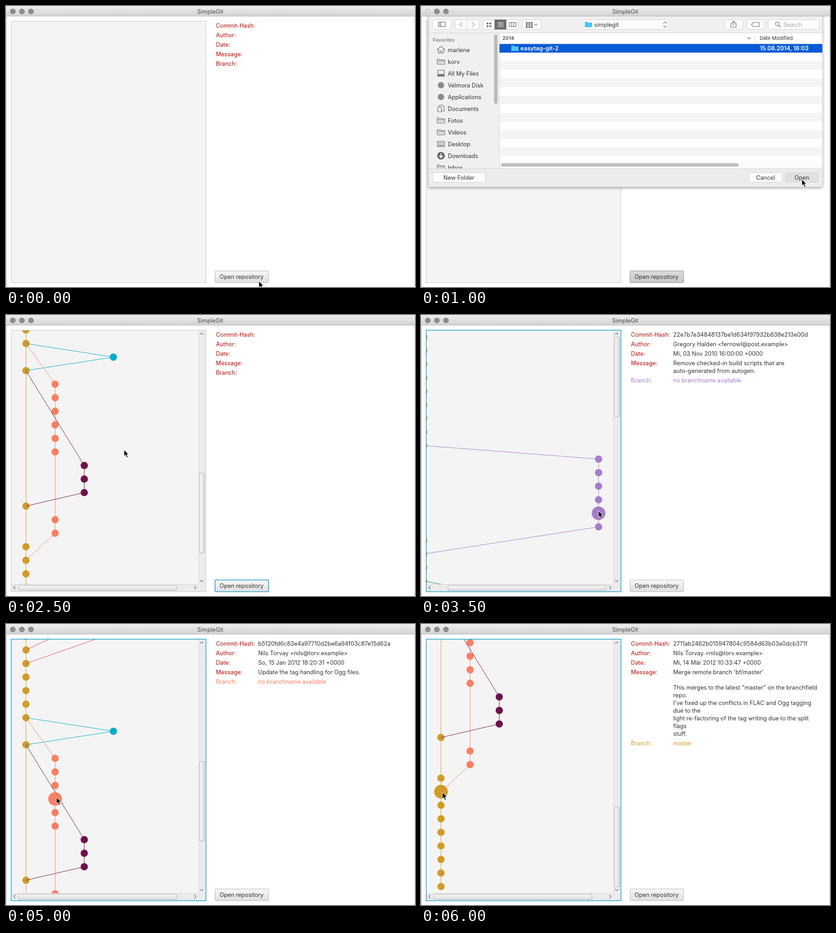
Animation of 901 by 621 pixels, one loop 6500 ms. Source, as an HTML page:

```html
<!DOCTYPE html>
<html lang="en">
<head>
<meta charset="utf-8">
<title>SimpleGit</title>
<style>
  html, body { margin: 0; width: 100%; height: 100%; overflow: hidden; background: #fff; }
  svg { display: block; width: 901px; height: 621px; }
  text { font: 12.7px Inter, Roboto, sans-serif; fill: #333; white-space: pre; }
  .small { font-size: 11px; }
  .mid { text-anchor: middle; }
  .key { fill: #b80a0a; }
  .icon { fill: none; stroke: #6a6a6a; stroke-width: 1.2; }
  .box { fill: #fdfdfd; stroke: #d3d3d3; }
</style>
</head>
<body>
<svg id="stage" viewBox="0 0 901 621">
  <defs>
    <linearGradient id="bar" x2="0" y2="1"><stop stop-color="#ededed"/><stop offset="1" stop-color="#d3d3d3"/></linearGradient>
    <linearGradient id="btn" x2="0" y2="1"><stop stop-color="#f7f7f7"/><stop offset="1" stop-color="#e0e0e0"/></linearGradient>
    <linearGradient id="btnDown" x2="0" y2="1"><stop stop-color="#dadada"/><stop offset="1" stop-color="#c9c9c9"/></linearGradient>
    <linearGradient id="thumbV"><stop stop-color="#f8f8f8"/><stop offset="1" stop-color="#dedede"/></linearGradient>
    <linearGradient id="thumbH" x2="0" y2="1"><stop stop-color="#f8f8f8"/><stop offset="1" stop-color="#dedede"/></linearGradient>
    <filter id="shade" x="-5%" y="-5%" width="110%" height="112%"><feDropShadow dx="0" dy="2" stdDeviation="3.5" flood-opacity=".42"/></filter>
    <clipPath id="view"><rect x="12" y="34" width="412" height="561"/></clipPath>
    <clipPath id="side"><rect x="17" y="60" width="155" height="299"/></clipPath>
    <clipPath id="below"><rect y="23" width="901" height="598"/></clipPath>
  </defs>
  <rect width="901" height="621" fill="#fff"/>
  <g id="window"></g>
  <g id="pane"></g>
  <g id="details"></g>
  <g id="button"></g>
  <g id="sheet"></g>
  <path id="cursor" d="M0 0V14.2L3.3 11.2 5.9 17 8.4 15.9 5.9 10.2H10.2Z" fill="#000" stroke="#fff" stroke-width="1"/>
</svg>
<script>
const $ = id => document.getElementById(id);
const esc = s => s.replace(/&/g, '&amp;').replace(/</g, '&lt;');
const rect = (x, y, w, h, attr = '') => `<rect x="${x}" y="${y}" width="${w}" height="${h}" ${attr}/>`;
const text = (x, y, s, attr = '') => `<text x="${x}" y="${y}" ${attr}>${esc(s)}</text>`;
const path = (d, attr = 'class="icon"') => `<path d="${d}" ${attr}/>`;
const disc = (x, y, r, fill) => `<circle cx="${x}" cy="${y}" r="${r}" fill="${fill}"/>`;

// ---- commit graph ----
const lanes = '0000000006666660000055545400000003' + '0111111222011000000000';
const colors = ['#d29b26', '#f97f61', '#6f114c', '#00aec7', '#dc4c57', '#078a5d', '#a57ccb'];
const links = [[0, 55], [9, 14], [20, 24], [23, 25], [35, 46], [41, 43],
  [8, 9], [14, 16], [18, 20], [24, 26], [19, 23], [23, 27], [25, 28],
  [32, 33], [33, 34], [32, 35], [34, 41], [43, 44], [46, 48]];
const maxScroll = 1115.5;
const nodeX = n => +(44 + 64.2 * lanes[n]).toFixed(2);
const nodeY = n => +(49 + 29.94 * n).toFixed(2);
const node = (n, r) => disc(nodeX(n), nodeY(n), r, colors[lanes[n]]);
const graph = [...lanes].map((_, n) => node(n, 8)).join('') + links.map(([a, b]) =>
  path(`M${nodeX(a)} ${nodeY(a)}L${nodeX(b)} ${nodeY(b)}`,
    `stroke="${colors[Math.max(lanes[a], lanes[b])]}"`)).join('');

function drawPane({ scroll, shift = 0, hover, focus }) {
  let out = rect(11.5, 33.5, 429, 578, 'fill="#f4f4f4" stroke="#c6c6c6"');
  if (scroll !== undefined) {
    const chevron = 'fill="none" stroke="#737373" stroke-width="1.2"';
    const thumb = 'rx="2" stroke="#b2b2b2" fill=';
    out += `<g clip-path="url(#view)"><g transform="translate(${-shift} ${-scroll})">${graph}` +
      (hover === undefined ? '' : node(hover, 15)) + '</g></g>' +
      rect(424, 34, 16, 577, 'fill="#ebebeb"') + rect(12, 595, 412, 16, 'fill="#ebebeb"') +
      path('M424.5 34V595M12 595.5H424', 'stroke="#d8d8d8"') +
      path('M427.5 43L431 39.5 434.5 43M427.5 586L431 589.5 434.5 586', chevron) +
      path('M20.5 598.5L17 602.5 20.5 606.5M415 598.5L418.5 602.5 415 606.5', chevron) +
      rect(426.5, 48.5 + 356 * scroll / maxScroll, 10.5, 176, thumb + '"url(#thumbV)"') +
      rect(27.5 + shift * 32 / 38, 597.5, 349, 11, thumb + '"url(#thumbH)"');
  }
  if (focus) out += rect(11.5, 33.5, 429, 578, 'fill="none" stroke="#18a2d1" stroke-width="1.5"');
  return out;
}

// ---- commit details ----
const unnamed = 'no branchname available';
const commits = {
  13: ['22e7b7e34848137be1d634f97932b838e213e00d', 'Gregory Halden <fernowl@post.example>',
    'Mi, 03 Nov 2010 16:00:00 +0000',
    'Remove checked-in build scripts that are\nauto-generated from autogen.', unnamed],
  22: ['8c41d07be92a5f3360e1bb94d7f25a08c6913e7c', 'Nils Torvay <nils@torv.example>',
    'Mo, 07 Feb 2011 11:42:18 +0000', 'Tidy up the build files.', unnamed],
  31: ['30a13ab5271ed2ec11a2b876c70c5cdce8b4276c', 'Nils Torvay <nils@torv.example>',
    'Sa, 23 Apr 2011 16:25:49 +0100',
    'Add a basic HACKING document to mention the\nprefered form for requests\nand what the coding style seems to be.', 'master'],
  38: ['b5120fd6c83e4a97710d2be6a94f03c87e15d62a', 'Nils Torvay <nils@torv.example>',
    'So, 15 Jan 2012 18:20:31 +0000', 'Update the tag handling for Ogg files.', unnamed],
  43: ['e4ba7c1a40a87015f73dc5a5630d543437030278', 'pebble7340 <me@pebble.example>',
    'Do, 16 Feb 2012 03:04:22 +0100',
    'Let the user choose which fields to split\n\nAdd a new Frame to the "Tag Settings" tab in the\npreferences, where the user can\nturn field splitting of for all fields, which were splitted\npreviously.\nAs this applies to vorbis comments in general, adapt\neverything for ogg files\ntoo.', unnamed],
  48: ['2711ab2462b015947804c9584d63b03a0dcb371f', 'Nils Torvay <nils@torv.example>',
    'Mi, 14 Mär 2012 10:33:47 +0000',
    "Merge remote branch 'bf/master'\n\nThis merges to the latest \"master\" on the branchfield\nrepo.\nI've fixed up the conflicts in FLAC and Ogg tagging\ndue to the\nlight re-factoring of the tag writing due to the split\nflags\nstuff.", 'master']
};

function drawDetails({ hover }) {
  const values = commits[hover] || ['', '', '', '', ''];
  let y = 47.8;
  return ['Commit-Hash:', 'Author:', 'Date:', 'Message:', 'Branch:'].map((label, i) => {
    const tint = i === 4 && hover !== undefined ? `style="fill:${colors[lanes[hover]]}"` : '';
    const lines = values[i].split('\n');
    const out = text(462.5, y, label, tint || 'class="key"') +
      lines.map((s, k) => text(555.5, y + 17 * k, s, tint)).join('');
    y += 21 + 17 * (lines.length - 1);
    return out;
  }).join('');
}

function drawButton({ button }) {
  const stroke = { down: '#8f8f8f', focus: '#1b9fcf' }[button] || '#b7b7b7';
  const fill = button === 'down' ? 'btnDown' : 'btn';
  return rect(460.5, 585.5, 118, 26, `rx="2.5" fill="url(#${fill})" stroke="${stroke}" stroke-width="${button === 'focus' ? 1.6 : 1}"`) +
    text(519, 603, 'Open repository', 'class="mid"');
}

function drawWindow({ sheet }) {
  return rect(0, 0, 901, 22, 'fill="url(#bar)"') + path('M0 22.5H901', 'stroke="#b4b4b4"') +
    path('M.5 23V621', 'stroke="#a3a9b2"') + path('M900.5 23V621', 'stroke="#c4c4c4"') +
    [15, 35, 55].map((x, i) => `<circle cx="${x}" cy="12" r="5.6" ${sheet && !i
      ? 'fill="#dcdcdc" stroke="#c4c4c4"' : 'fill="#8e8e8e" stroke="#7b7b7b"'}/>`).join('') +
    text(450, 17, 'SimpleGit', 'class="mid" style="fill:#4a4a4a"');
}

// ---- file chooser ----
const folder = (x, y) => path(`M${x} ${y - 6}h6l2 2h9v10h-17zM${x} ${y - 2}h17`, 'fill="#d9d9d9" stroke="#777"');
const blueFolder = (x, y) => path(`M${x} ${y - 6}h6l2 2h8v10h-16z`, 'fill="#4fc3f3"');
const sideIcons = {
  home: y => path(`M35 ${y}L44 ${y - 8} 53 ${y}M38 ${y - 2}v9h12v-9M42 ${y + 7}v-5h4v5`),
  folder: y => folder(35.5, y),
  files: y => rect(37, y - 7, 14, 9, 'class="icon"') + rect(36, y + 2, 16, 5, 'fill="#777"'),
  mark: y => disc(44, y, 7, '#8a8a8a'),
  docs: y => path(`M37 ${y - 4}h8v11h-8zM41 ${y - 4}v-4h6l4 4v9h-6`),
  desktop: y => rect(36, y - 6, 16, 12, 'fill="#ccc" stroke="#777"') + path(`M38 ${y + 3.5}h12`),
  down: y => disc(44, y, 8.5, '#6a6a6a') + path(`M44 ${y - 5}v8M40.5 ${y}l3.5 4 3.5-4`, 'fill="none" stroke="#fff" stroke-width="2"')
};
const places = [['marlene', 'home'], ['korv', 'folder'], ['All My Files', 'files'], ['Velmora Disk', 'mark'],
  ['Applications', 'mark'], ['Documents', 'docs'], ['Fotos', 'folder'], ['Videos', 'folder'],
  ['Desktop', 'desktop'], ['Downloads', 'down'], ['Inbox', 'folder']];

function toolbar() {
  const boxes = [[25, 41], [75, 52], [136, 78], [223, 41], [355, 191], [669, 39], [717, 39], [764, 113]];
  let grid = '';
  for (let i = 0; i < 4; i++) grid += rect(145 + 6 * (i % 2), 37 + 6 * (i >> 1), 3.5, 3.5, 'fill="#555"');
  for (let i = 0; i < 9; i++) grid += rect(231 + 5.5 * (i % 3), 36 + 4.5 * (i / 3 | 0), 4, 3, 'fill="#555"');
  return boxes.map(([x, w]) => rect(x + .5, 30.5, w, 21, 'rx="3.5" class="box"')).join('') + grid +
    rect(162, 30, 26, 22, 'fill="#6c6c6c"') + path('M101.5 31V51', 'stroke="#d3d3d3"') +
    rect(38.5, 35.5, 15, 10, 'class="icon"') + path('M43.5 35.5v10M40 38h2M40 40.5h2M40 43h2') +
    path('M91 36L85 41 91 46M112 36L118 41 112 46', 'fill="none" stroke="#a9a9a9" stroke-width="1.4"') +
    path('M169 36.5h13M169 39.5h13M169 42.5h13M169 45.5h13', 'stroke="#fff"') +
    rect(194.5, 36.5, 15, 9, 'class="icon"') + path('M199.5 36.5v9M204.5 36.5v9') +
    path('M250 39.5l3 3 3-3M534 38.5l3.5-3.5 3.5 3.5M534 43.5l3.5 3.5 3.5-3.5') +
    blueFolder(361, 41) + text(381.5, 45.5, 'simplegit') +
    path('M686 38h-3v9h11v-9h-3M688.5 43V33.5M685.5 36.5l3-3 3 3') +
    path('M728 41l4-4.5h13v9h-13z') +
    '<circle cx="785" cy="39.5" r="4.2" class="icon"/>' + path('M788 43l4 4') +
    text(798, 45.5, 'Search', 'style="fill:#a8a8a8"');
}

function drawSheet({ sheet }) {
  if (!sheet) return '';
  const picked = sheet === 'picked';
  const rowStyle = picked ? 'style="fill:#fff;font-weight:600"' : '';
  let out = `<g clip-path="url(#below)">${rect(17, 15, 867, 384.5, 'fill="#ececec" filter="url(#shade)"')}</g>` +
    rect(17, 23, 867, 36, 'fill="#f0f0f0"') + toolbar() +
    rect(17, 60, 155, 299, 'fill="#f0f0f0"') + rect(173, 60, 711, 299, 'fill="#fff"');
  for (let y = 84; y < 330; y += 38) out += rect(173, y, 711, 19, 'fill="#f4f4f4"');
  if (picked) out += rect(173, 84, 711, 19, 'fill="#075bd6"');
  out += blueFolder(199, 93.5) + text(219, 98.3, 'easytag-git-2', rowStyle) + text(746.5, 98.3, '15.08.2014, 18:03', rowStyle) +
    text(179.5, 75, '2014', 'class="small" style="font-weight:500"') +
    text(746, 75, 'Date Modified', 'class="small"') + path('M719 69.5l3.5 3.5 3.5-3.5') +
    path('M17 59.5H884M17 359.5H884M172.5 60V359M735.5 62V80M173 82.5H884', 'stroke="#d5d5d5"') +
    rect(173, 344, 711, 15, 'fill="#fafafa"') + rect(176, 347.5, 524, 7.5, 'rx="3.75" fill="#c0c0c0"') +
    '<g clip-path="url(#side)">' + text(26, 79, 'Favorites', 'class="small" style="fill:#777;font-weight:500"') +
    places.map(([name, icon], i) => sideIcons[icon](97 + 26 * i) + text(59, 101.6 + 26 * i, name)).join('') +
    '</g>' + rect(161, 63, 7.5, 153, 'rx="3.75" fill="#b9b9b9"');
  for (const [x, w, label, attr] of [[25, 116, 'New Folder', ''], [722, 73, 'Cancel', ''],
    [802, 73, 'Open', picked ? 'style="fill:#dfdfdf"' : '']])
    out += rect(x + .5, 368.5, w, 21, 'rx="3.5" class="box" ' + attr) + text(x + w / 2 + .5, 384, label, 'class="mid"');
  return out;
}

// ---- timeline ----
const stepMs = 500;
const steps = [
  { at: [557, 608] },
  { at: [300, 92], sheet: 'open', button: 'down' },
  { at: [839, 383], sheet: 'picked', button: 'down' },
  { at: [560, 340], scroll: 0, button: 'focus' },
  { at: [260, 298], scroll: 430, button: 'focus' },
  { at: [260, 298], scroll: 944, button: 'focus' },
  { at: [330, 600], scroll: 0, shift: 38, focus: true },
  { at: [391, 433], scroll: 0, shift: 38, hover: 13, focus: true },
  { at: [366, 284], scroll: 420, hover: 22, focus: true },
  { at: [48, 333], scroll: 637.5, hover: 31, focus: true },
  { at: [111, 383], scroll: 800, hover: 38, focus: true },
  { at: [174, 457.5], scroll: 881, hover: 43, focus: true },
  { at: [47, 372], scroll: maxScroll, hover: 48, focus: true }
];
const layers = { window: drawWindow, pane: drawPane, details: drawDetails, button: drawButton, sheet: drawSheet };
let shown = -1;

function tick(now) {
  const i = Math.floor(now / stepMs) % steps.length;
  if (i !== shown) {
    shown = i;
    for (const id in layers) $(id).innerHTML = layers[id](steps[i]);
    $('cursor').setAttribute('transform', `translate(${steps[i].at})`);
  }
  requestAnimationFrame(t => tick(Math.max(0, t - start)));
}
const start = performance.now();
tick(0);
</script>
</body>
</html>
```
